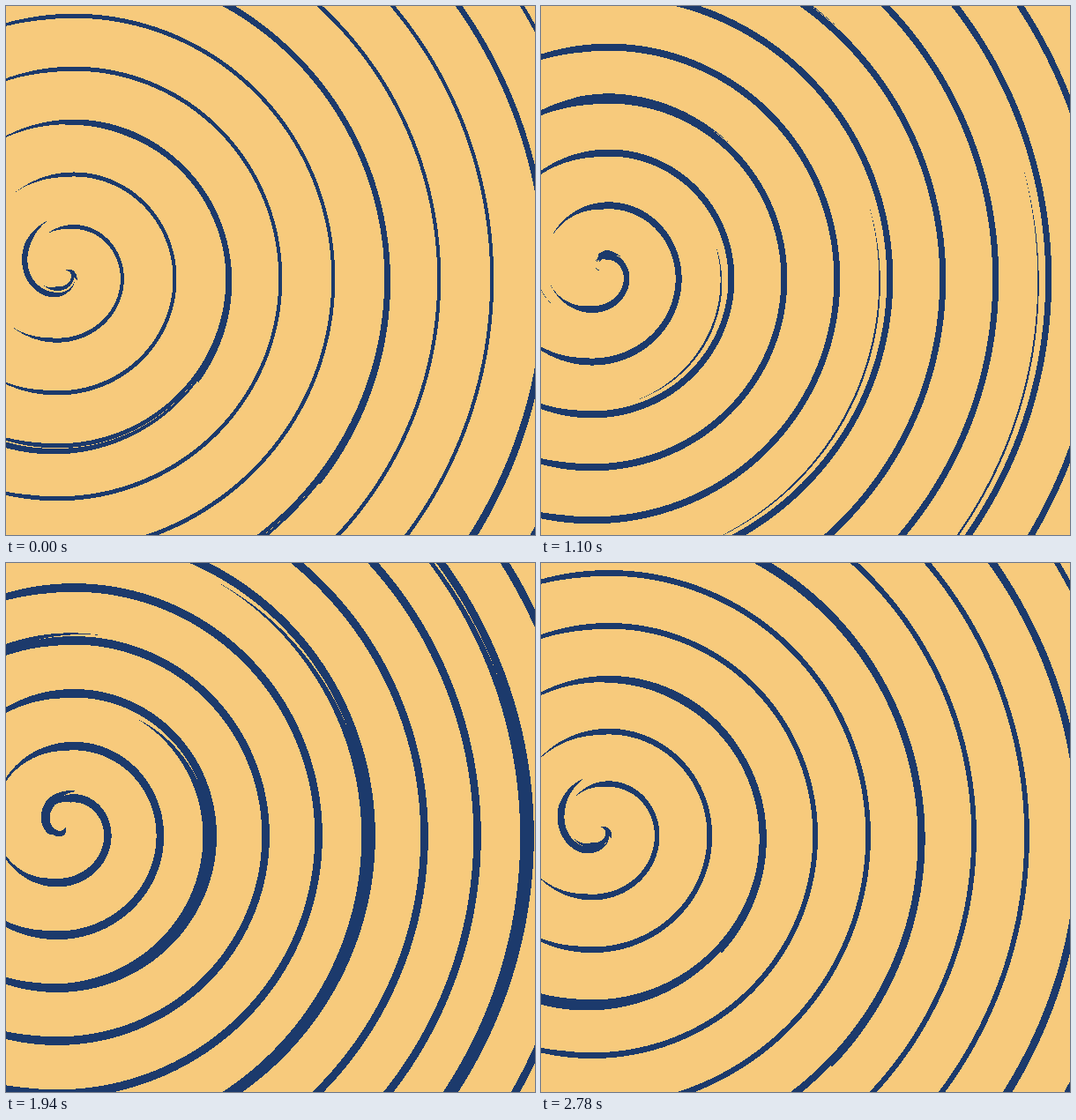
An HTML page with a canvas for the animation above (2.8 s loop, 600 by 600 pixels).

```html
<!DOCTYPE html>
<html lang="en">
<head>
<meta charset="utf-8">
<title>Turning spiral</title>
<style>
  html, body { margin: 0; width: 100%; height: 100%; overflow: hidden; background: #f7ca7c; }
  canvas { display: block; width: 600px; height: 600px; }
</style>
</head>
<body>
<canvas id="stage" width="600" height="600"></canvas>
<script>
const SIZE = 600, CX = 67.5, CY = 300;
const LOOP = 2800, PITCH = 60, SLOPE = PITCH / (2 * Math.PI);
const PAPER = 0xff7ccaf7, INK = 0xff6c3a1c; // ABGR

const ctx = document.getElementById('stage').getContext('2d');
const image = ctx.createImageData(SIZE, SIZE);
const pixels = new Uint32Array(image.data.buffer);

// Polar coordinates of every pixel; lean is how far the stroke's normal points right.
const field = () => new Float32Array(SIZE * SIZE);
const radius = field(), degrees = field(), lean = field();
for (let i = 0; i < SIZE * SIZE; i++) {
  const x = i % SIZE + 0.5 - CX, y = Math.floor(i / SIZE) + 0.5 - CY;
  const r = Math.hypot(x, y), a = Math.atan2(y, x);
  radius[i] = r;
  degrees[i] = a * 180 / Math.PI;
  lean[i] = Math.cos(a - Math.atan2(SLOPE, r));
}

const mod = (v, m) => ((v % m) + m) % m;

// Outer edge of the main band, as [step, distance].
const edgeKeys = [[0, 5.6], [13, 8.7], [23, 8.6], [34, 6.7], [41, 10.2], [49, 6.6], [59, 7.3], [60, 5.6]];

function outerEdge(step) {
  const i = edgeKeys.findIndex(key => key[0] > step);
  const [s0, e0] = edgeKeys[i - 1], [s1, e1] = edgeKeys[i];
  return e0 + (e1 - e0) * (step - s0) / (s1 - s0);
}

// Second stroke: a looser spiral that repeats every three turns of the main one.
// It shows on the right where it runs inside the main band, on the left where outside.
function onSecondStroke(i, turn, maxWidth) {
  for (let psi = 90 + mod(degrees[i] + turn - 90, 360); psi < 700; psi += 360) {
    const centre = 106 + psi * (1 / 6 + 0.053);
    const distance = Math.abs(mod(radius[i] - centre + 90, 180) - 90);
    if (distance > 6) continue;
    const phase = (400 - psi) / 265;
    const width = SLOPE * (Math.sign(phase) * lean[i] + 1.07 - 1.95 * Math.abs(phase));
    if (distance < Math.min(width, maxWidth) / 2) return true;
  }
  return false;
}

function draw(step) {
  const outer = outerEdge(step), inner = 1.6;
  for (let i = 0; i < pixels.length; i++) {
    const offset = mod(radius[i] - degrees[i] / 6 - step, PITCH);
    const swell = 0.5 * (1 - lean[i] * lean[i]);
    const onMain = offset < outer + swell && offset > inner - swell && offset > -SLOPE * lean[i];
    pixels[i] = onMain || onSecondStroke(i, step * 6, outer - inner + 2.5) ? INK : PAPER;
  }
  ctx.putImageData(image, 0, 0);
}

// Three steps every 140 ms, held for 20, 100 and 20 ms.
function stepAt(time) {
  const t = time % LOOP, beat = t % 140;
  return 3 * Math.floor(t / 140) + (beat < 20 ? 0 : beat < 120 ? 1 : 2);
}

let shown = -1;
function tick() {
  const step = stepAt(performance.now());
  if (step !== shown) draw(shown = step);
  requestAnimationFrame(tick);
}
tick();
</script>
</body>
</html>
```
